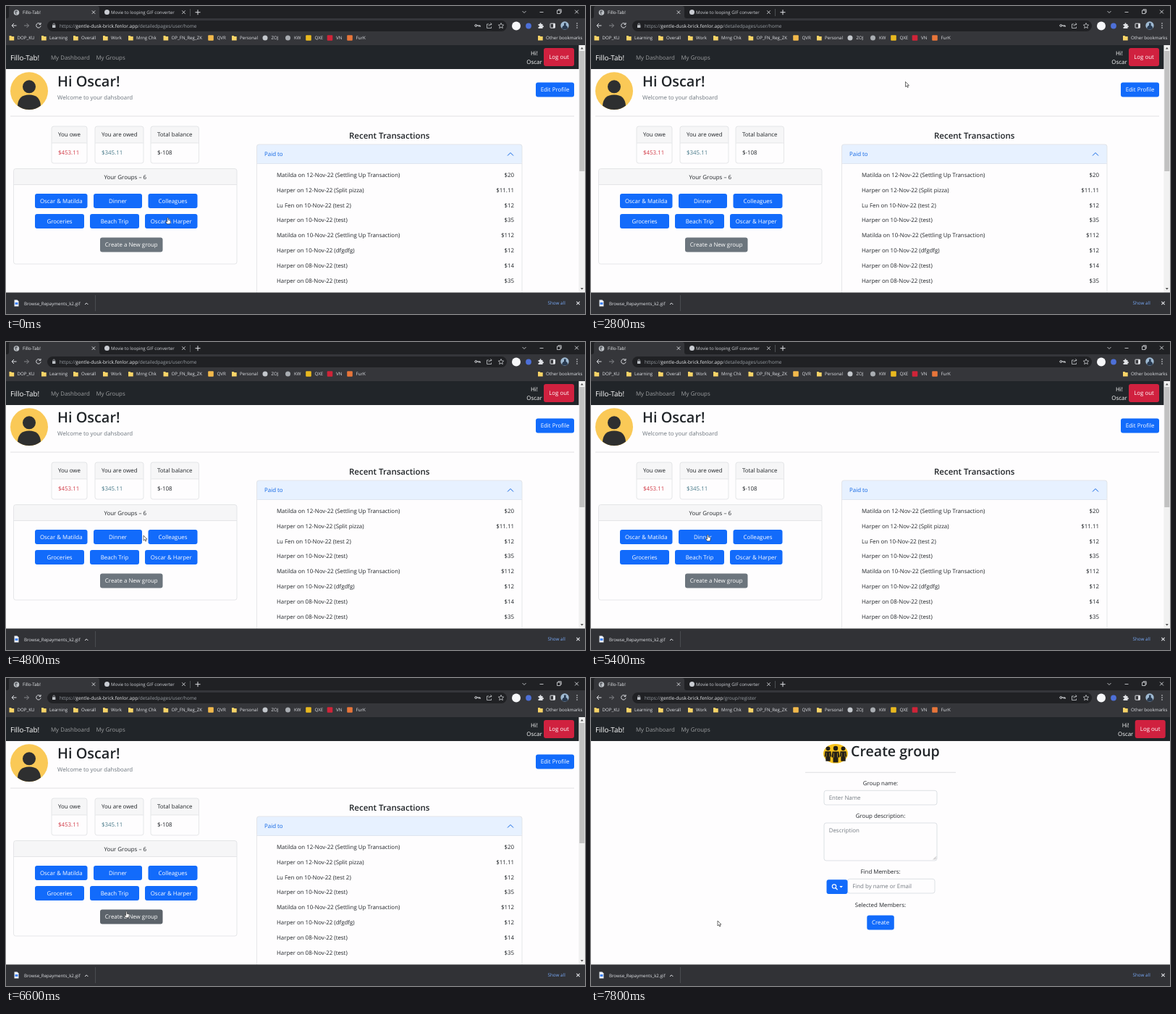
Recreate the animation shown at these times as an HTML page. Size 800 by 425 pixels, loop 8000 ms.

```html
<!DOCTYPE html>
<html lang="en">
<head>
<meta charset="utf-8">
<title>Expense sharing walkthrough</title>
<style>
  html, body { margin: 0; width: 100%; height: 100%; overflow: hidden; background: #fff; }
  svg { display: block; width: 100vw; height: 100vh; }
  text { font-family: "Open Sans", "Noto Sans", sans-serif; text-rendering: geometricPrecision; white-space: pre; }
</style>
</head>
<body>
<svg id="stage" viewBox="0 0 800 425"></svg>
<script>
const BODY = 7.9, SMALL = 6.15;
const INK = '#212529', BLUE = '#126bfb', GREY = '#6c757d', GREY_HOVER = '#5c636a';
const LINE = '#dcdde0', CHROME = '#35363a', DARK = '#202124', ICON = '#dfe1e5';

// Drawing helpers
const rect = (x, y, w, h, fill, r = 0, extra = '') =>
  `<rect x="${x}" y="${y}" width="${w}" height="${h}" rx="${r}" fill="${fill}" ${extra}/>`;
const circle = (x, y, r, fill, extra = '') => `<circle cx="${x}" cy="${y}" r="${r}" fill="${fill}" ${extra}/>`;
const stroke = (d, color = ICON, w = 1) => `<path d="${d}" fill="none" stroke="${color}" stroke-width="${w}"/>`;
const shape = (d, fill) => `<path d="${d}" fill="${fill}"/>`;
const text = (s, x, y, fill = INK, size = BODY, anchor = 'start', weight = 400) =>
  `<text x="${x}" y="${y}" fill="${fill}" font-size="${size}" text-anchor="${anchor}" font-weight="${weight}">${s}</text>`;
const button = (label, x, y, w, fill = BLUE, h = 20, id = '') =>
  rect(x, y, w, h, fill, 3, id && `id="${id}"`) + text(label, x + w / 2, y + h / 2 + 2.9, '#fff', BODY, 'middle');
const outline = (x, y, w, h, color = LINE) => rect(x, y, w, h, 'none', 3, `stroke="${color}" stroke-width=".7"`);
const cross = (x, y, r = 2.2, w = .9) =>
  stroke(`M${x - r} ${y - r}l${2 * r} ${2 * r}m0 ${-2 * r}l${-2 * r} ${2 * r}`, ICON, w);
const folder = x => shape(`M${x} 41h2.5l1 1h3.2v5.5h-6.7z`, '#f9d467');

function card(x, y, w, h, headerHeight) {
  return rect(x, y, w, headerHeight, '#f6f6f7', 3) + outline(x, y, w, h) +
    stroke(`M${x} ${y + headerHeight}h${w}`, LINE, .7);
}

function browser() {
  const folders = [[4.5, 'DOP_KU'], [49, 'Learning'], [93, 'Overall'], [134, 'Work'], [169, 'Mrng Chk'],
    [217.5, 'OP_FN_Reg_ZK'], [312, 'Personal'], [735, 'Other bookmarks']];
  const links = [[283, 'QVR', '#f2b94b'], [358, 'ZOJ', '#c3c7cc'], [389.5, 'KW', '#a9adb2'],
    [418, 'QXE', '#e9b91f'], [447.5, 'VN', '#cf2438'], [475, 'FurK', '#e8753a']];
  return rect(0, 0, 800, 18, DARK) + rect(0, 17, 800, 37, CHROME) +
    shape('M1 17q3 0 3-3V3q0-3 3-3H126q3 0 3 3V14q0 3 3 3z', CHROME) +
    circle(14.5, 9, 3.8, '#bfc3c8') + shape('M12 7l3-1 1 2-2 1 1 3-2-1z', '#62666b') +
    text('Fillo-Tab!', 23, 11.3, '#e8eaed', SMALL) +
    circle(139.5, 8.5, 3.5, '#c9ccd2') +
    text('Movie to looping GIF converter', 145, 11.3, '#d0d3d8', SMALL) +
    cross(121, 8.6) + cross(245.5, 8.6) + stroke('M254.5 4v10', '#5f6368', .7) +
    stroke('M265 5.2v7m-3.5-3.5h7') +
    stroke('M713.5 7l2.5 2.5L718.5 7', ICON, .8) + stroke('M737.5 8.5h5', ICON, .8) +
    stroke('M761.5 6h4.5v4.5h-4.5zm1.5 0v-1.2h4.2V9H766', ICON, .8) + cross(788.5, 8, 2.4) +
    stroke('M14.5 27h-6.5m3-3l-3 3 3 3') + stroke('M25 27h6.5m-3-3l3 3-3 3', '#85878b') +
    stroke('M47.3 24.7a3.2 3.2 0 1 0 .8 2.7M48 23v2.4h-2.4') +
    rect(57, 20, 635, 15, DARK, 7.5) +
    rect(64, 26.3, 4.4, 3.8, '#bdc1c6', .5) + stroke('M65 26.5v-1.3a1.2 1.2 0 0 1 2.4 0v1.3', '#bdc1c6', .7) +
    `<text x="74" y="29.6" font-size="6.55" fill="#9aa0a6">https://<tspan fill="#e8eaed">gentle-dusk-brick.fenlor.app</tspan><tspan id="path"></tspan></text>` +
    circle(649.3, 27, 1.4, 'none', `stroke="${ICON}" stroke-width="1"`) + stroke('M651 27h4.2v1.8m-1.7-1.8v1.5') +
    stroke('M667 25h-2.5v5.5h6V28.5M667 28q0-3 4-3m-1.6-1.6l1.8 1.6-1.8 1.6', ICON, .7) +
    stroke('M684 23.5l1.1 2.4 2.6.3-2 1.8.6 2.6-2.3-1.3-2.3 1.3.6-2.6-2-1.8 2.6-.3z', ICON, .7) +
    circle(705, 27.5, 6, '#f7f8fa') + circle(722, 27.5, 3.9, '#4d70d8') +
    shape('M735.5 25h2q-.3-1.8 1-1.8t1 1.8h2v2.3q1.5-.3 1.5 1t-1.5 1V31h-6v-2q1.6 0 1.6-1t-1.6-1z', ICON) +
    rect(752, 24.2, 6.5, 6, 'none', .5, `stroke="${ICON}"`) + rect(756, 24.2, 2.5, 6, ICON) +
    circle(772, 27, 5.7, '#9fbad2') + shape('M768 31q1-4 3-4V23.5h2.7V27q2.5.4 2.3 4-4 3-8 0z', '#293a50') +
    [24, 27, 30].map(y => circle(789, y, .8, ICON)).join('') +
    folders.map(([x, s]) => folder(x) + text(s, x + 11, 46.4, ICON, SMALL)).join('') +
    links.map(([x, s, c], i) =>
      (i === 1 || i === 2 ? circle(x, 44, 3.5, c) : rect(x - 3.8, 40.2, 7.6, 7.6, c, 1)) +
      text(s, x + 8.5, 46.4, ICON, SMALL)).join('');
}

function navbar() {
  return rect(0, 54, 800, 33, INK) +
    text('Fillo-Tab!', 6, 74.5, '#fff', 9.9) +
    text('My Dashboard', 62, 74, '#9b9d9f') + text('My Groups', 124.5, 74, '#9b9d9f') +
    `<g id="account">${text('Hi!', 730, 67.5, '#fff', BODY, 'middle')}${text('Oscar', 730, 80, '#fff', BODY, 'middle')}${button('Log out', 743, 58, 42, '#d0213f', 25)}</g>`;
}

function scrollbar() {
  return rect(791.4, 54, 8.6, 341.4, '#f1f1f1') + rect(792.3, 62, 7, 166, '#c1c1c1') +
    shape('M793.8 59.5l2-2.5 2 2.5z', '#505050') + shape('M793.8 389l2 2.5 2-2.5z', '#505050');
}

function downloads() {
  return rect(0, 395.4, 800, 30, '#313236') +
    shape('M11.5 405.5h4l2 2v7h-6z', '#eef2f8') + rect(12.5, 409, 4, 3, '#4285f4') +
    text('Browse_Repayments_k2.gif', 25, 412.6, ICON, SMALL) +
    stroke('M109 412l2.2-2.2 2.2 2.2') + stroke('M123.5 399v22', '#55575b', .7) +
    text('Show all', 748.5, 412.2, '#78a9f7', 6.3) + cross(790.5, 410, 2.2, 1.1);
}

function home() {
  const balances = [[63, 49, 'You owe', '$453.11', '#d13a46'], [123, 67, 'You are owed', '$345.11', '#477988'],
    [200, 66.5, 'Total balance', '$-108', INK]];
  const groups = [['Oscar &amp; Matilda', 40, 259, 72.5], ['Dinner', 121, 259, 67], ['Colleagues', 196.5, 259, 68],
    ['Groceries', 40, 287, 68], ['Beach Trip', 116, 287, 68], ['Oscar &amp; Harper', 192, 287, 72.5]];
  const payments = [['Matilda on 12-Nov-22 (Settling Up Transaction)', 20], ['Harper on 12-Nov-22 (Split pizza)', 11.11],
    ['Lu Fen on 10-Nov-22 (test 2)', 12], ['Harper on 10-Nov-22 (test)', 35],
    ['Matilda on 10-Nov-22 (Settling Up Transaction)', 112], ['Harper on 10-Nov-22 (dfgdfg)', 12],
    ['Harper on 08-Nov-22 (test)', 14], ['Harper on 08-Nov-22 (test)', 35]];
  return circle(32, 117.3, 26, '#fac957') + circle(32, 111.3, 9, '#2e2f30') +
    shape('M16 137.5Q17 122.5 32 122.5T48 137.5Q41 143 32 143T16 137.5z', '#2e2f30') +
    text('Hi Oscar!', 71, 111, INK, 19.9, 'start', 600) +
    text('Welcome to your dahsboard', 71, 129, GREY) +
    button('Edit Profile', 732, 105.5, 53) + stroke('M6 152h779', '#d8d9db', .8) +
    balances.map(([x, w, title, amount, color]) =>
      card(x, 166, w, 51, 23) + text(title, x + 9, 180) + text(amount, x + 9, 205.3, color)).join('') +
    card(10.5, 224.5, 308.5, 131.5, 22) + text('Your Groups – 6', 164.7, 238.6, INK, BODY, 'middle') +
    groups.map(g => button(...g)).join('') +
    button('Create a New group', 130, 319.5, 86.5, GREY, 20, 'create') +
    text('Recent Transactions', 529.7, 183, INK, 11.5, 'middle', 600) +
    rect(346.5, 191, 366.5, 26.5, '#e7f1ff', 3) + outline(346.5, 191, 366.5, 220) +
    stroke('M346.5 217.5h366.5', '#d3dbe6', .6) +
    text('Paid to', 357, 207.3, '#0c63e4') + stroke('M693 206.5l4-4 4 4', '#0c63e4') +
    payments.map(([s, amount], i) => {
      const y = 235.8 + 20.85 * i;
      return text(s, 374, y) + text('$' + amount, 702, y, INK, BODY, 'end');
    }).join('');
}

function createGroup() {
  const person = (x, y, s) => `<g transform="translate(${x} ${y}) scale(${s})">` +
    circle(0, -8, 3.2, '#231f17') + shape('M-4.5-3.5h9l1 8h-2v7h-7v-7h-2z', '#231f17') +
    stroke('M-2.6-1.5v6m5.2-6v6', '#f7c21c', .6) + '</g>';
  const label = (s, y) => text(s, 400, y, INK, BODY, 'middle');
  const field = (s, x, y, w, h) => outline(x, y, w, h, '#ced4da') + text(s, x + 6.7, y + 13, '#747b82');
  return `<ellipse cx="338" cy="104.3" rx="17" ry="13.3" fill="#f7c21c"/>` +
    person(327.5, 104.5, .9) + person(348.5, 104.5, .9) + person(338, 105, 1) +
    text('Create group', 359, 108, INK, 19.6, 'start', 600) + stroke('M296 130.3h208', '#d8d9db', .8) +
    label('Group name:', 148.3) + field('Enter Name', 322, 155.3, 156, 19.7) +
    label('Group description:', 193) + field('Description', 322, 200, 156, 52) +
    stroke('M473 250.5l4-4m-2 4l2-2', '#777', .6) +
    label('Find Members:', 270) + field('Find by name or Email', 354.5, 277.3, 120.5, 19.7) +
    rect(325.5, 278.3, 29, 19.7, BLUE, 3) + circle(336, 287.6, 2.7, 'none', 'stroke="#fff" stroke-width="1.1"') +
    stroke('M338 289.7l2.6 2.6', '#fff', 1.3) + shape('M343.3 287h4.6l-2.3 2.5z', '#fff') +
    label('Selected Members:', 316) + button('Create', 381.3, 327.5, 37.5);
}

const pointer = `<g id="cursor" stroke="#222" stroke-width=".65" fill="#fff" stroke-linejoin="round">
  <path id="arrow" d="M0 0V7L1.6 5.5 2.8 8 3.9 7.5 2.8 5.1H4.9z"/>
  <path id="hand" d="M-.8 5V.6Q0-.6.8.6V3.2L3.2 3.7Q4 4 3.9 5L3.2 8.8H-.9L-3 5.8Q-2.8 4.5-1.6 5.5L-.8 6z"/></g>`;

const stage = document.getElementById('stage');
stage.innerHTML = rect(0, 0, 800, 425, '#fefdfe') + browser() + navbar() +
  `<g id="home">${home()}${scrollbar()}</g><g id="form">${createGroup()}</g>` + downloads() + pointer;
const el = id => document.getElementById(id);
const show = (id, visible) => el(id).setAttribute('display', visible ? 'inline' : 'none');

const LOOP = 8000, SUBMIT_TIME = 7800;
const moves = [[0, 223.5, 292], [200, 435, 105], [2800, 434.5, 104.5], [3200, 385, 145], [3400, 275, 222],
  [3800, 214, 252], [4000, 208, 256], [4400, 200, 262], [4800, 190, 267], [5000, 180, 267], [5200, 168, 266],
  [5400, 161.4, 266], [5600, 160, 268], [5800, 160, 280], [6000, 161, 294], [6200, 163, 308], [6400, 165, 318],
  [6600, 166.4, 322], [6800, 168, 326], [7000, 170, 331], [7400, 171, 333], [7600, 171.4, 333], [7800, 175, 335]];
const hotspots = [[40, 259, 72.5], [121, 259, 67], [196.5, 259, 68], [40, 287, 68], [116, 287, 68],
  [192, 287, 72.5], [130, 319.5, 86.5]];
const CREATE_SPOT = hotspots.length - 1;

function draw(now) {
  const t = now % LOOP;
  const [, x, y] = moves.findLast(m => m[0] <= t);
  const onForm = t >= SUBMIT_TIME;
  const hovered = onForm ? -1 : hotspots.findIndex(([bx, by, w]) => x >= bx && x <= bx + w && y >= by && y <= by + 20);
  show('home', !onForm);
  show('form', onForm);
  show('hand', hovered >= 0);
  show('arrow', hovered < 0);
  el('create').setAttribute('fill', hovered === CREATE_SPOT ? GREY_HOVER : GREY);
  el('account').setAttribute('transform', `translate(${onForm ? 8.7 : 0} 0)`);
  el('path').textContent = onForm ? '/group/register' : '/detailedpages/user/home';
  el('cursor').setAttribute('transform', `translate(${x} ${y})`);
}

const start = performance.now();
function tick() {
  draw(performance.now() - start);
  requestAnimationFrame(tick);
}
tick();
</script>
</body>
</html>
```
